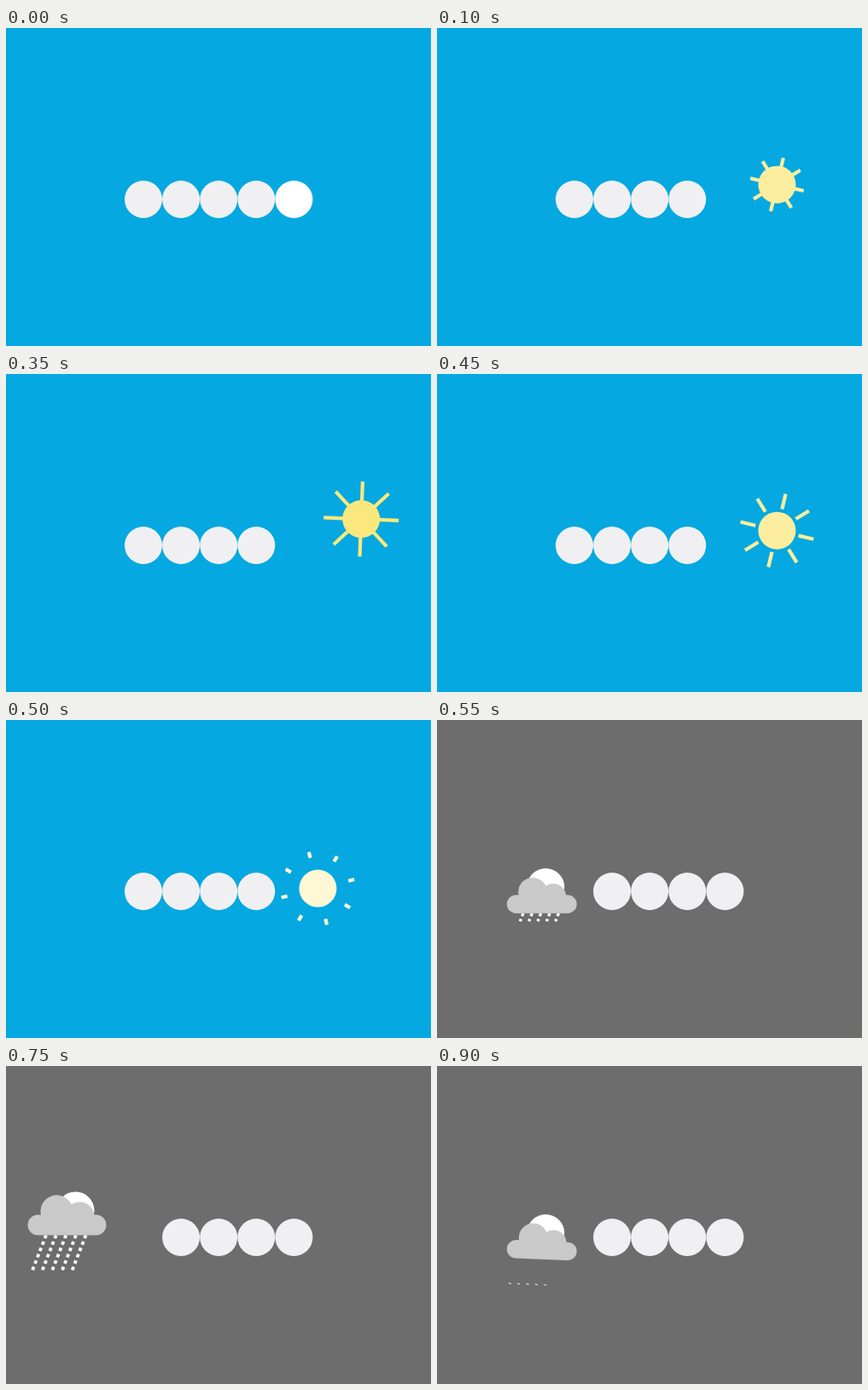
These frames come from a looping animation (498 by 373 pixels, 0.95 s). An HTML page with a canvas:

```html
<!DOCTYPE html>
<html lang="en">
<head>
<meta charset="utf-8">
<title>Weather cradle</title>
<style>
  html, body { margin: 0; width: 498px; height: 373px; overflow: hidden; background: #05a8e0; }
  canvas { display: block; }
</style>
</head>
<body>
<canvas id="stage" width="498" height="373"></canvas>
<script>
const ctx = document.getElementById('stage').getContext('2d');

const LOOP = 950, STEP = 50;
const ARM = 116, PIVOT_Y = 85, SWING = 43.3 * Math.PI / 180;
const RADIUS = 22, GAP = 44.1, LEFT = 161;
const SKY = '#05a8e0', STORM = '#6d6d6d', BALL = '#f0f0f2', CLOUD = '#c9c9c9';
const SUN = { mid: 275, half: 250 };
const RAIN = { mid: 725, half: 200 };

const ballX = i => LEFT + i * GAP;
const mix = (a, b, p) => a + (b - a) * p;

function disc(x, y, r, color) {
  ctx.fillStyle = color;
  ctx.beginPath();
  ctx.arc(x, y, r, 0, Math.PI * 2);
  ctx.fill();
}

// u runs 1 -> 0 on the way out and 0 -> 1 on the way back
function phase(t, { mid, half }) {
  const u = Math.min(1, Math.abs(t - mid) / half);
  return { u, back: t > mid, out: 1 - u ** 3.7 };
}

function bob(index, side, out) {
  const a = SWING * out;
  return {
    a,
    x: ballX(index) + side * ARM * Math.sin(a),
    y: PIVOT_Y + ARM * Math.cos(a)
  };
}

function drawSun({ u, back, out }) {
  const { a, x, y } = bob(4, 1, out);
  const color = `rgb(${mix(255, 251, out)},${mix(255, 232, out)},${mix(255, 122, out)})`;
  const edge = 30 * u ** 2.6;
  const inner = back ? 14 + edge : 14;
  const outer = back ? 44 : 44 - edge;

  ctx.save();
  ctx.translate(x, y);
  ctx.rotate(-a);
  ctx.strokeStyle = color;
  ctx.lineWidth = 4.2;
  ctx.beginPath();
  for (let i = 0; i < 8 && u < 1; i++) {
    const c = Math.cos(i * Math.PI / 4), s = Math.sin(i * Math.PI / 4);
    ctx.moveTo(c * inner, s * inner);
    ctx.lineTo(c * outer, s * outer);
  }
  ctx.stroke();
  ctx.restore();
  disc(x, y, RADIUS, color);
}

function drawRain(u, back, rest) {
  const top = 12, bottom = 53, slope = -16 / 41;
  const from = back ? 10 + 43 * Math.min(1, 1.13 * u) ** 2.6 : top;
  const to = back ? bottom : 10 + 43 * (1 - u ** 2.6);
  const a = Math.max(top, from), b = Math.min(bottom, to);
  if (b <= a) return;

  ctx.save();
  if (back) ctx.scale(1, 1 - 0.13 * rest);
  ctx.strokeStyle = '#fff';
  ctx.lineWidth = 3.8;
  ctx.setLineDash([4, 3.95]);
  ctx.lineDashOffset = (a - top) * Math.hypot(1, slope);
  for (let i = 0; i < 5; i++) {
    const x = -24.5 + i * 11.65;
    ctx.beginPath();
    ctx.moveTo(x + (a - top) * slope, a);
    ctx.lineTo(x + (b - top) * slope, b);
    ctx.stroke();
  }
  ctx.restore();
}

function drawCloud({ u, back, out }) {
  const { x, y } = bob(0, -1, out);
  const rest = (1 - out) / 0.61;
  const size = mix(0.82, 1, out);

  disc(x, y, RADIUS, '#fff');
  ctx.save();
  ctx.translate(x - 1 - 9 * out, y + 22 - 5 * out);
  ctx.scale(size, size);
  if (back) ctx.rotate(0.042 * rest);
  drawRain(u, back, rest);
  disc(-12, -16, 19, CLOUD);
  disc(15, -10, 17, CLOUD);
  ctx.beginPath();
  ctx.roundRect(-46, -12, 92, 24, 12);
  ctx.fill();
  ctx.restore();
}

function draw(t) {
  const storm = t > SUN.mid + SUN.half;
  ctx.fillStyle = storm ? STORM : SKY;
  ctx.fillRect(0, 0, 498, 373);
  const first = storm ? 1 : 0;
  for (let i = first; i < first + 4; i++) disc(ballX(i), PIVOT_Y + ARM, RADIUS, BALL);
  if (storm) drawCloud(phase(t, RAIN));
  else drawSun(phase(t, SUN));
}

function tick() {
  const t = performance.now() % LOOP;
  draw(Math.floor(t / STEP) * STEP);
  requestAnimationFrame(tick);
}
tick();
</script>
</body>
</html>
```
